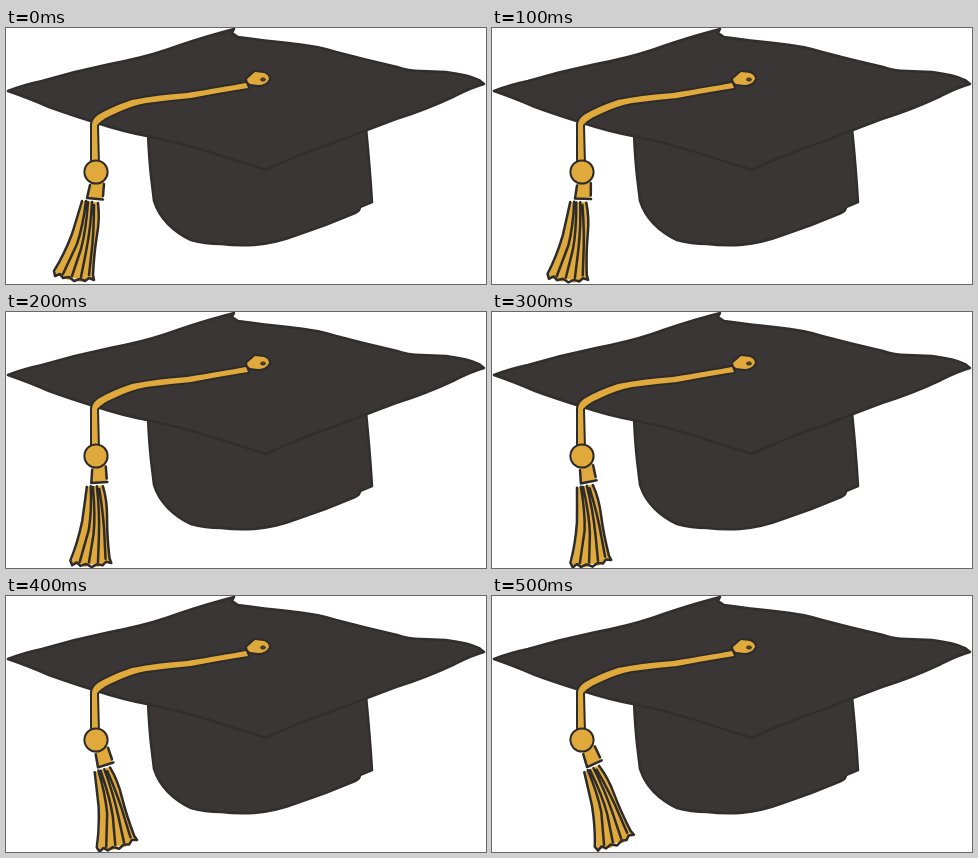
An HTML page that plays this animation: 480x256 px, repeating every 0.6 s.

```html
<!DOCTYPE html>
<html lang="en">
<head>
<meta charset="utf-8">
<title>Graduation cap</title>
<style>
  html, body { margin: 0; width: 100%; height: 100%; overflow: hidden; background: #fff; }
  svg { display: block; width: 100vw; height: 100vh; }
  path, circle { stroke-linecap: round; stroke-linejoin: round; }
  .cap { fill: #3a3635; stroke: #312e2d; stroke-width: 2.5; }
  .line { fill: none; stroke: #2e2b2b; stroke-width: 2.5; }
  .gold { fill: #dfa93b; }
  .inked { fill: #dfa93b; stroke: #2e2b2b; stroke-width: 4; paint-order: stroke; }
</style>
</head>
<body>
<svg viewBox="0 0 480 256">
  <!-- crown and board -->
  <path class="cap" d="M142 106Q143 130 145 148L148 173Q152 186 162 196Q172 206 185 212
    Q199 216 215 216Q231 218 248 217Q270 215 291 207Q321 197 349 185Q354 183 354 179L366 174Q364 140 360 100L260 90Z"/>
  <path class="cap" d="M2 63Q17 57 36 53Q70 43 104 36Q136 30 160 22Q191 11 217 4L228 1L226 5L232 9
    Q260 13 282 15Q312 18 330 24Q360 32 391 39Q402 43 415 43L440 44Q463 47 473 52L478 56Q464 60 449 68
    Q419 82 390 91Q358 103 330 114Q291 127 260 142Q228 132 200 123Q171 114 141 108
    Q115 103 91 95Q65 87 43 79Q25 71 2 63Z"/>

  <!-- cord and button -->
  <path class="inked" d="M240 55Q218 59 181 65Q151 67 126 72Q105 79 92 87Q85 92 86 100
    L86 137H92L91 97Q96 91 108 86Q124 78 140 75Q162 72 185 70Q216 64 242 60Z"/>
  <path class="inked" d="M241 51L249 44L258 45Q263 47 263 51Q260 57 252 57L244 56Q241 54 241 51Z"/>
  <ellipse cx="257" cy="51.5" rx="2.5" ry="1.5" fill="#5a421f" stroke="#2e2b2b"/>

  <g id="tassel">
    <path class="gold" d="M85 154L98 153L97 170L81 170Z"/>
    <path class="line" d="M84 157L81 170L97 171.5M98 156L97 168"/>
    <path class="gold" d="M76 173L92 174Q93 194 90 217L87 252L81 251L74 254L69 250L62 252L56 249L48 246
      Q62 222 67 204Z"/>
    <path class="line" d="M76 173Q71 190 66 206Q58 227 48 243L49 248L54 246L57 250L63 249L68 253
      L74 251L79 253L83 250L88 252L87 247Q88 225 91 207Q94 190 92 175"/>
    <path class="line" d="M80 173Q77 198 71 216L57 246M82 174Q80 203 75 221L66 248
      M86 174Q85 198 80 224L75 249M88 177Q88 206 85 229L83 247"/>
  </g>
  <circle class="inked" cx="90" cy="144" r="10.6"/>
</svg>
<script>
  const tassel = document.getElementById("tassel");
  const swing = [0, 4.3, 9.2, 16.8, 23.4, 29.8];
  const step = 100;

  function draw(now) {
    const pose = Math.floor(now / step) % swing.length;
    tassel.setAttribute("transform", `rotate(${-swing[pose]} 90 144)`);
    requestAnimationFrame(draw);
  }
  draw(performance.now());
</script>
</body>
</html>
```
